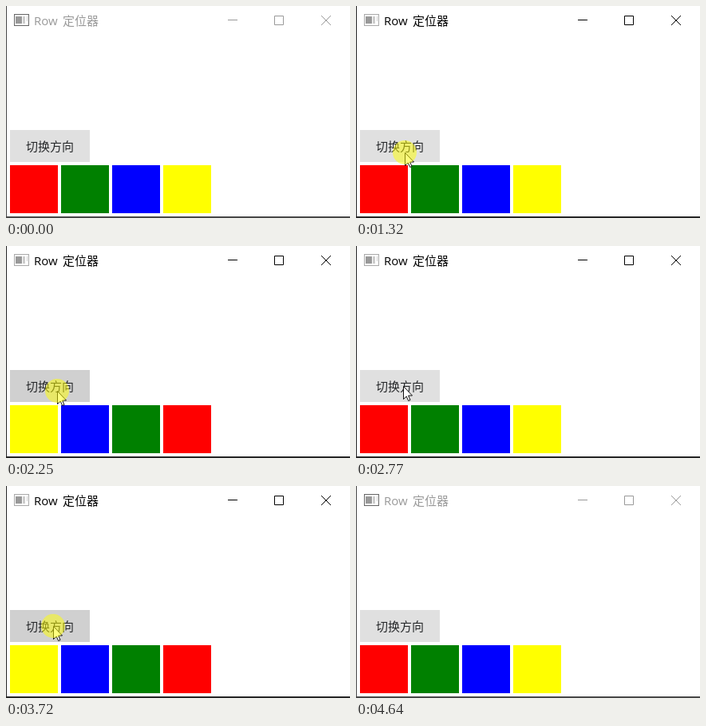
An HTML page that plays this animation: 431 px wide and 265 px high, repeating every 4.72 s.

```html
<!DOCTYPE html>
<html lang="zh">
<head>
<meta charset="utf-8">
<style>
  html, body { margin: 0; width: 100%; height: 100%; overflow: hidden; background: #fff; }
  svg { display: block; width: 431px; height: 265px; }
  text { font: 15px "Open Sans", "Noto Sans CJK SC", "Noto Sans CJK", sans-serif; }
  .cjk { font-family: "Noto Sans CJK SC", "Noto Sans CJK", sans-serif; }
  #chrome { color: #999; }
  #chrome.active { color: #000; }
  #frame { fill: #484848; }
  .active #frame { fill: #262626; }
  #icon { stroke: #666; }
  .active #icon { stroke: #aaa; }
</style>
</head>
<body>
<svg viewBox="0 0 431 265">
  <g id="chrome">
    <path id="frame" d="M0 0H1V263H431V265H0Z"/>
    <rect id="icon" x="10.5" y="10.5" width="18" height="14" fill="#fff"/>
    <path d="M12 13h8v9h-8z" fill="#999"/>
    <path d="M21 13h3v9h-3zM26 13h1v6h-1z" fill="#ccc"/>
    <g fill="currentColor">
      <text x="35" y="24">Row</text>
      <text class="cjk" x="71" y="24">定位器</text>
    </g>
    <path d="M278 17.5H290M336.5 12.5h11v11h-11zM395 12L407 24M407 12L395 24" fill="none" stroke="currentColor"/>
  </g>
  <rect id="button" x="5" y="155" width="100" height="40"/>
  <text class="cjk" x="25" y="181" fill="#26282a" font-weight="500">切换方向</text>
  <g id="row"></g>
  <path id="cursor" d="M.5 .5V16.5L4.2 13L6.7 18.5L9 17.5L6.6 12H11.5Z" fill="#fff" stroke="#111"/>
  <circle id="press" r="15" fill="#ff0" fill-opacity=".5"/>
</svg>
<script>
const LOOP = 4720;
const $ = id => document.getElementById(id);
const colors = ['#f00', '#008000', '#00f', '#ff0'];

// Each click: press time, release time, whether the button darkens.
const clicks = [[1320, 1470, false], [2250, 2310, true], [3000, 3100, true], [3720, 3800, true]];

// Cursor moves: start, end, number of steps, from, to.
const moves = [
  [450, 830, 6, [176, 234], [62, 190]],
  [1000, 1080, 2, [61, 186], [61, 183]],
  [1940, 1940, 1, [64, 181], [64, 181]],
  [2390, 2770, 6, [64, 180], [59, 175]],
  [3950, 4020, 2, [190, 204], [352, 240]]
];
const HIDE = 4090;

const squares = colors.map((_, i) => {
  const square = document.createElementNS('http://www.w3.org/2000/svg', 'rect');
  const box = { x: 5 + 64 * i, y: 199, width: 60, height: 60 };
  for (const key in box) square.setAttribute(key, box[key]);
  return $('row').appendChild(square);
});

function cursorAt(t) {
  const move = moves.filter(m => m[0] <= t).pop();
  if (!move || t >= HIDE) return null;
  const [start, end, steps, from, to] = move;
  if (t >= end) return to;
  const p = Math.floor((t - start) / (end - start) * (steps - 1)) / (steps - 1);
  const eased = 1 - (1 - p) ** 2;
  return from.map((v, i) => Math.round(v + (to[i] - v) * eased));
}

function draw(t) {
  const click = clicks.find(([down, up]) => t >= down && t < up);
  const reversed = clicks.filter(([, up]) => t >= up).length % 2;
  const position = cursorAt(t);

  $('chrome').setAttribute('class', t >= 1320 && t < 4640 ? 'active' : '');
  $('button').setAttribute('fill', click && click[2] ? '#d0d0d0' : '#e0e0e0');
  squares.forEach((s, i) => s.setAttribute('fill', colors[reversed ? 3 - i : i]));
  $('cursor').style.display = position ? '' : 'none';
  $('press').style.display = click ? '' : 'none';
  if (position) {
    for (const id of ['cursor', 'press']) $(id).setAttribute('transform', `translate(${position})`);
  }
}

const begin = performance.now();
function tick() {
  draw((performance.now() - begin) % LOOP);
  requestAnimationFrame(tick);
}
tick();
</script>
</body>
</html>
```
